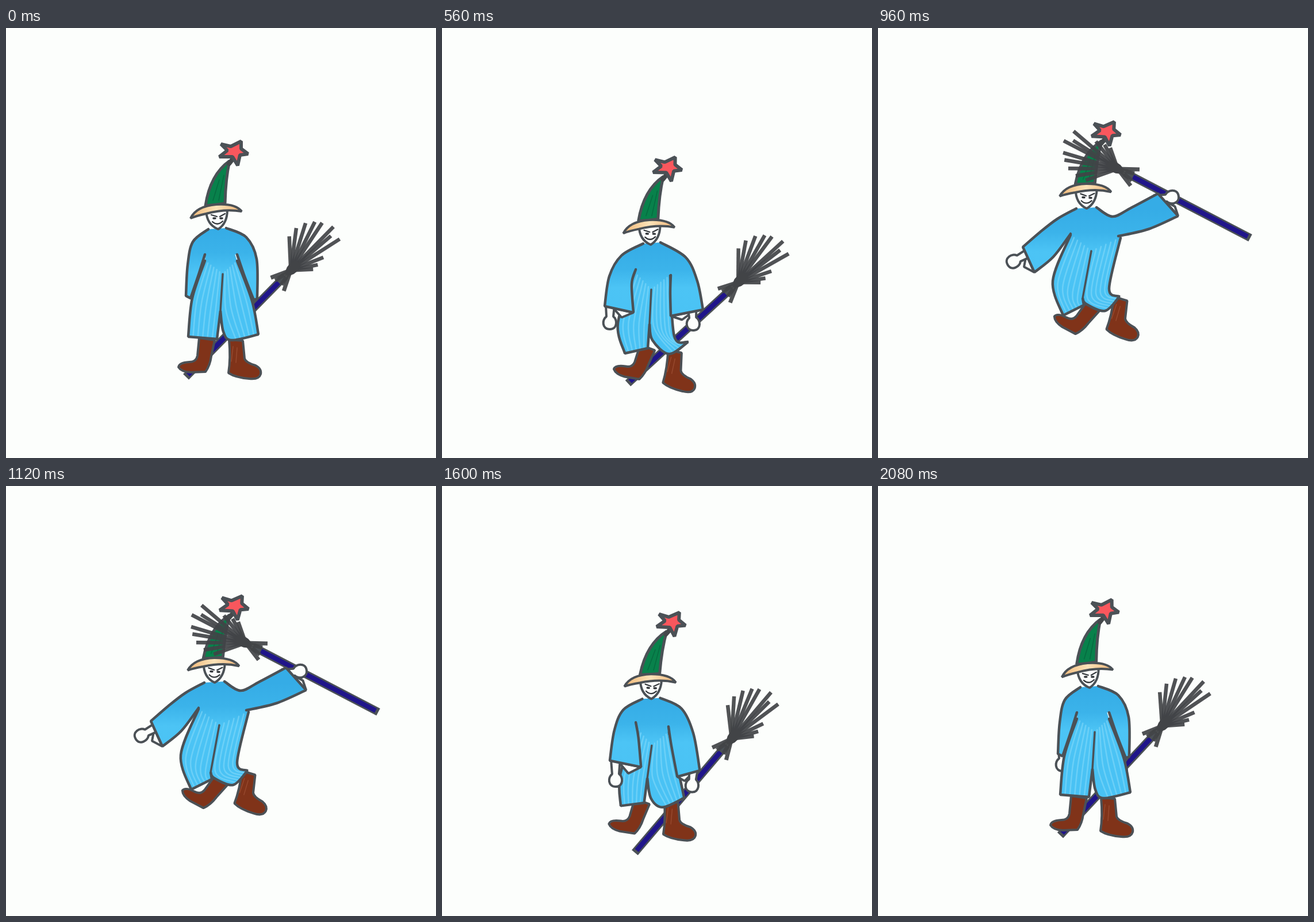
An HTML page with a canvas that plays this animation: 748x748 px, repeating every 2160 ms.

```html
<!DOCTYPE html>
<html lang="en">
<head>
<meta charset="utf-8">
<title>Wizard with broom</title>
<style>
  html, body { margin: 0; width: 100%; height: 100%; overflow: hidden; background: #fcfefc; }
  canvas { display: block; width: 748px; height: 748px; }
</style>
</head>
<body>
<canvas id="stage" width="748" height="748"></canvas>
<script>
const ctx = document.getElementById('stage').getContext('2d');
const LOOP = 2160, STEP = 80, GRIP = 106;
const INK = '#4b5156', BACK = '#fcfefc';

// head, hand: x, y, angle; grip: x, y, hand angle, broom angle; boots: heel x, y, angle (twice)
// body: left armpit, side, hem out, hem in, crotch, right inner, hem, outer, side, armpit, seam top
// left, right: neck, shoulder, elbow, outer cuff, inner cuff, underside, armpit
const stand = {
  t: 0, head: [369, 350, 0], hand: [336, 478, 0], grip: [421, 497, 0, 134.5],
  boots: [347, 599, 0, 387, 602, 0], shrug: [0],
  body: [346, 405, 324, 470, 317, 537, 367, 541, 373, 492, 378, 528, 392, 543, 439, 533, 428, 475, 402, 405, 377, 428],
  left: [352, 350, 325, 372, 316, 412, 313, 466, 321, 470, 334, 432, 346, 394],
  right: [383, 348, 418, 364, 436, 402, 437, 471, 431, 473, 415, 432, 402, 394]
};
const crouch = {
  t: 320, head: [356, 390, 9], hand: [286, 432, 5], grip: [437, 438, 0, 127.5],
  boots: [333, 606, 22, 381, 604, 10], shrug: [1],
  body: [312, 420, 287, 508, 316, 572, 340, 552, 341, 520, 347, 548, 370, 569, 397, 548, 401, 470, 408, 420, 356, 450],
  left: [337, 378, 318, 346, 296, 357, 282, 397, 312, 411, 318, 414, 330, 402],
  right: [386, 374, 409, 352, 429, 353, 450, 409, 407, 417, 403, 414, 392, 398]
};
const step = {
  t: 560, head: [363, 377, 1], hand: [292, 512, 0], grip: [437, 514, -5, 137.5],
  boots: [343, 612, 12, 384, 619, 8], shrug: [0],
  body: [335, 425, 306, 513, 318, 566, 358, 557, 361, 515, 366, 543, 395, 567, 428, 546, 404, 536, 397, 430, 364, 455],
  left: [350, 375, 312, 396, 291, 432, 283, 484, 333, 495, 330, 445, 337, 420],
  right: [380, 373, 424, 399, 444, 440, 454, 490, 398, 501, 397, 460, 398, 430]
};
const leap = {
  t: 960, head: [363, 314, 3], hand: [236, 406, 60], grip: [511, 294, -100, 27.5],
  boots: [343, 533, 30, 397, 526, 12], shrug: [0],
  body: [335, 360, 304, 440, 322, 500, 358, 482, 356, 470, 362, 480, 395, 492, 420, 467, 402, 453, 422, 365, 371, 388],
  left: [345, 314, 312, 332, 282, 355, 252, 381, 272, 425, 305, 398, 335, 358],
  right: [380, 312, 408, 328, 440, 313, 487, 288, 522, 327, 470, 350, 418, 362]
};
const land = {
  t: 1360, head: [364, 393, 5.5], hand: [282, 525, 5], grip: [450, 530, -5, 127],
  boots: [333, 612, 29, 395, 609, 8], shrug: [0],
  body: [336, 435, 298, 535, 320, 579, 348, 562, 352, 530, 360, 562, 385, 573, 415, 550, 402, 525, 398, 452, 361, 474],
  left: [346, 396, 312, 414, 290, 450, 277, 492, 325, 513, 328, 455, 337, 433],
  right: [381, 395, 425, 420, 449, 462, 464, 508, 413, 534, 400, 480, 397, 450]
};
const rise = {
  t: 1760, head: [364.5, 352, 1.5], hand: [311, 493, 0], grip: [431, 495, 0, 124],
  boots: [338, 597, 0, 380, 602, -3], shrug: [0],
  body: [338, 405, 318, 478, 307, 538, 356, 540, 362, 492, 367, 527, 385, 545, 427, 533, 417, 470, 396, 408, 369, 432],
  left: [350, 350, 318, 370, 306, 405, 300, 462, 350, 469, 346, 425, 338, 394],
  right: [379, 348, 411, 362, 430, 400, 441, 469, 419, 472, 406, 425, 395, 394]
};
const settle = { ...stand, t: 2080, head: [368, 351, -0.5], hand: [321, 484, 0], grip: [422, 495, 0, 133] };

// Same pose moved down, still holding the broom high
function lowered(pose, t, dy) {
  const drop = list => list.map((v, i) => i % 2 ? v + dy : v);
  const put = ([x, y, ...rest]) => [x, y + dy, ...rest];
  const [lx, ly, la, rx, ry, ra] = pose.boots;
  return { ...pose, t, head: put(pose.head), hand: put(pose.hand), grip: put(pose.grip),
    boots: [lx, ly + dy, la, rx, ry + dy, ra],
    body: drop(pose.body), left: drop(pose.left), right: drop(pose.right) };
}

const poses = [stand, crouch, step, leap, lowered(leap, 1120, 28), land, rise, settle];

function poseAt(t) {
  const n = poses.length;
  const get = i => poses[(i + n) % n];
  const time = i => get(i).t + Math.floor(i / n) * LOOP;
  let i = n - 1;
  while (poses[i].t > t) i--;
  const [t0, t1, t2, t3] = [i - 1, i, i + 1, i + 2].map(time);
  const span = t2 - t1, u = (t - t1) / span, v = 1 - u;
  const out = {};
  for (const key in stand) {
    if (key === 't') continue;
    out[key] = get(i)[key].map((b, k) => {
      const a = get(i - 1)[key][k], c = get(i + 1)[key][k], d = get(i + 2)[key][k];
      const m1 = (c - a) / (t2 - t0) * span, m2 = (d - b) / (t3 - t1) * span;
      return b * (1 + 2 * u) * v * v + m1 * u * v * v + c * u * u * (3 - 2 * u) - m2 * u * u * v;
    });
  }
  return out;
}

const pairs = list => list.reduce((r, v, i) => (i % 2 ? r[r.length - 1].push(v) : r.push([v]), r), []);
const mix = (a, b, k) => [a[0] + (b[0] - a[0]) * k, a[1] + (b[1] - a[1]) * k];

// Adds a smooth curve through the points to a path
function curve(path, pts, start) {
  if (start) path.moveTo(...pts[0]); else path.lineTo(...pts[0]);
  for (let i = 0; i < pts.length - 1; i++) {
    const a = pts[i - 1] || pts[i], b = pts[i], c = pts[i + 1], d = pts[i + 2] || c;
    path.bezierCurveTo(b[0] + (c[0] - a[0]) / 6, b[1] + (c[1] - a[1]) / 6,
      c[0] - (d[0] - b[0]) / 6, c[1] - (d[1] - b[1]) / 6, c[0], c[1]);
  }
}

function ink(path, width = 4.5, color = INK) {
  ctx.lineWidth = width;
  ctx.strokeStyle = color;
  ctx.stroke(path);
}

function shape(path, fill, width) {
  ctx.fillStyle = fill;
  ctx.fill(path);
  ink(path, width);
}

function placed(x, y, angle, draw) {
  ctx.save();
  ctx.translate(x, y);
  ctx.rotate(angle * Math.PI / 180);
  draw();
  ctx.restore();
}

const bootL = new Path2D('M-11-60L-14-29Q-16-18-28-18Q-46-17-47-9Q-42-1-26 0L0-1Q8-12 10-28L16-56Z');
const bootR = new Path2D('M1-60Q4-28 0-2Q12 6 36 8Q53 10 56 0Q58-9 47-15Q30-20 28-27L25-58Z');
const brim = new Path2D('M321 331Q331 310 366 307Q399 305 410 319Q381 314 348 323Q330 327 321 331Z');
const cone = new Path2D('M347 309Q355 255 389 231Q382 262 381 305Q364 308 347 309Z');
const star = new Path2D('M374 202L391 206L409 197L409 210L421 219L407 221L403 239L394 224L371 224L385 213Z');
const face = new Path2D('M348 317Q349 342 369 350Q385 340 385 316Z');
const features = new Path2D('M357 325L367 328M372 328L381 323M359 337Q368 345 377 336');
const eyes = new Path2D('M361 331h3M373 331h3');

function drawBoots([lx, ly, la, rx, ry, ra]) {
  const streaks = new Path2D('M8-48L5-22M15-46L13-20');
  placed(lx, ly, la, () => { shape(bootL, '#803319', 4); });
  placed(rx, ry, ra, () => { shape(bootR, '#803319', 4); ink(streaks, 1.5, '#96492e'); });
}

function drawHead([x, y, angle]) {
  placed(x, y, angle, () => {
    ctx.translate(-369, -350);
    shape(face, '#fbfdfd', 4);
    ink(features, 2.2, '#33373b');
    ink(eyes, 3.5, '#33373b');
    shape(cone, '#08814b', 5);
    ink(new Path2D('M371 264L360 300M379 256L370 300'), 1.5, '#066b40');
    const straw = ctx.createLinearGradient(322, 0, 410, 0);
    straw.addColorStop(0, '#f0b878');
    straw.addColorStop(0.5, '#fbe3b9');
    straw.addColorStop(1, '#eeb477');
    shape(brim, straw, 4);
    ink(new Path2D('M388 236L396 226'), 8, '#44484b');
    shape(star, '#f9575d', 6);
  });
}

// Bristles as angle and length, relative to the end of the handle
const bristles = [[-47, 59], [-37, 74], [-27, 86], [-18, 94], [-11, 99], [0, 106],
  [5, 92], [13, 101], [24, 61], [34, 48], [43, 39]];
const tufts = [[25, 37], [12, 32], [-26, 38], [-12, 30]];

function drawBroom([x, y, , angle]) {
  placed(x, y, angle, () => {
    ctx.translate(-GRIP, 0);
    ctx.lineCap = 'butt';
    ink(new Path2D('M14 0H260'), 14, INK);
    ink(new Path2D('M30 0H255'), 8.5, '#20158a');
    const fan = (list, side, width) => list.forEach(([a, len]) => {
      const r = a * Math.PI / 180, p = new Path2D();
      p.moveTo(0, 0);
      p.lineTo(side * len * Math.cos(r), side * len * Math.sin(r));
      ink(p, width, 'rgba(66,68,71,.92)');
    });
    fan(bristles, -1, 6.5);
    fan(tufts, 1, 7);
    ctx.fillStyle = '#424447';
    ctx.beginPath();
    ctx.ellipse(-5, 0, 15, 9, 0, 0, 7);
    ctx.fill();
    ctx.lineCap = 'round';
  });
}

function drawHand([x, y, angle], sleeve) {
  const p = pairs(sleeve), cuff = new Path2D();
  [mix(p[3], p[4], 0.3), p[4], mix(p[4], [x, y], 0.5)].forEach(q => cuff.lineTo(...q));
  cuff.closePath();
  shape(cuff, BACK, 4);
  placed(x, y, angle, () => {
    shape(new Path2D('M-7-30L-6-10C-14-5-14 12 0 12C14 12 13-6 6-10L8-30'), BACK, 4);
  });
}

function drawSleeve(list, chest, fill) {
  const p = pairs(list);
  const area = new Path2D(), line = new Path2D();
  for (const path of [area, line]) {
    curve(path, p.slice(0, 4), true);
    curve(path, p.slice(4));
  }
  area.lineTo(...chest);
  ctx.fillStyle = fill;
  ctx.fill(area);
  ink(line);
}

function drawBody(pose, fill) {
  const p = pairs(pose.body), area = new Path2D(), line = new Path2D();
  for (const path of [area, line]) {
    curve(path, p.slice(0, 3), true);
    curve(path, [p[3], p[4]]);
    curve(path, p.slice(4, 8));
    curve(path, p.slice(7, 10));
  }
  area.lineTo(pose.right[0], pose.right[1]);
  area.lineTo(pose.left[0], pose.left[1]);
  ctx.fillStyle = fill;
  ctx.fill(area);

  ctx.save();
  ctx.clip(area);
  const stripes = new Path2D();
  for (let k = 1; k < 6; k++) {
    const f = k / 6;
    curve(stripes, [mix(p[0], p[10], f), mix(p[1], p[4], f), mix(p[2], p[3], f)], true);
    curve(stripes, [mix(p[10], p[9], f), mix(p[4], p[8], f), mix(p[6], p[7], f)], true);
  }
  ink(stripes, 2.5, 'rgba(135,218,250,.55)');
  ctx.restore();

  ink(line);
  const seam = new Path2D();
  curve(seam, [p[10], p[4]], true);
  ink(seam, 3.5);
}

function drawNeckline(pose) {
  if (pose.shrug[0] < 0.05) return;
  const [x, y] = pose.head, p = pairs(pose.body), line = new Path2D();
  curve(line, [[x - 16, y - 2], [x - 28, y + 12], p[0]], true);
  curve(line, [[x + 18, y - 2], [x + 38, y + 14], mix(p[9], [x, y], 0.2)], true);
  ctx.globalAlpha = Math.min(1, pose.shrug[0]);
  ink(line, 3.5);
  ctx.globalAlpha = 1;
}

function draw(t) {
  const pose = poseAt(t);
  const [x, y] = pose.head;
  const chest = [(pose.left[0] + pose.right[0]) / 2, (pose.left[1] + pose.right[1]) / 2 + 45];
  const robe = ctx.createLinearGradient(0, y, 0, y + 150);
  robe.addColorStop(0, '#35ace6');
  robe.addColorStop(0.28, '#3bb3ea');
  robe.addColorStop(0.5, '#4cc4f5');
  robe.addColorStop(1, '#49c2f4');

  const broom = () => drawBroom(pose.grip);
  const boots = () => drawBoots(pose.boots);
  const body = () => drawBody(pose, robe);
  const head = () => drawHead(pose.head);
  const hands = () => { drawHand(pose.hand, pose.left); drawHand(pose.grip, pose.right); };
  const sleeves = () => {
    drawSleeve(pose.left, chest, robe);
    drawSleeve(pose.right, chest, robe);
    drawNeckline(pose);
  };

  ctx.fillStyle = BACK;
  ctx.fillRect(0, 0, 748, 748);
  ctx.lineCap = 'round';
  ctx.lineJoin = 'bevel';
  const inFront = t >= 640 && t < 1600;
  const hidden = t < 240 || t >= 1920;
  const order = inFront ? [boots, body, head, broom, hands, sleeves]
    : hidden ? [broom, hands, boots, body, sleeves, head]
    : [broom, boots, body, hands, sleeves, head];
  order.forEach(layer => layer());
}

const begin = performance.now();
function tick() {
  const t = (performance.now() - begin) % LOOP;
  draw(Math.floor(t / STEP) * STEP);
  requestAnimationFrame(tick);
}
tick();
</script>
</body>
</html>
```
